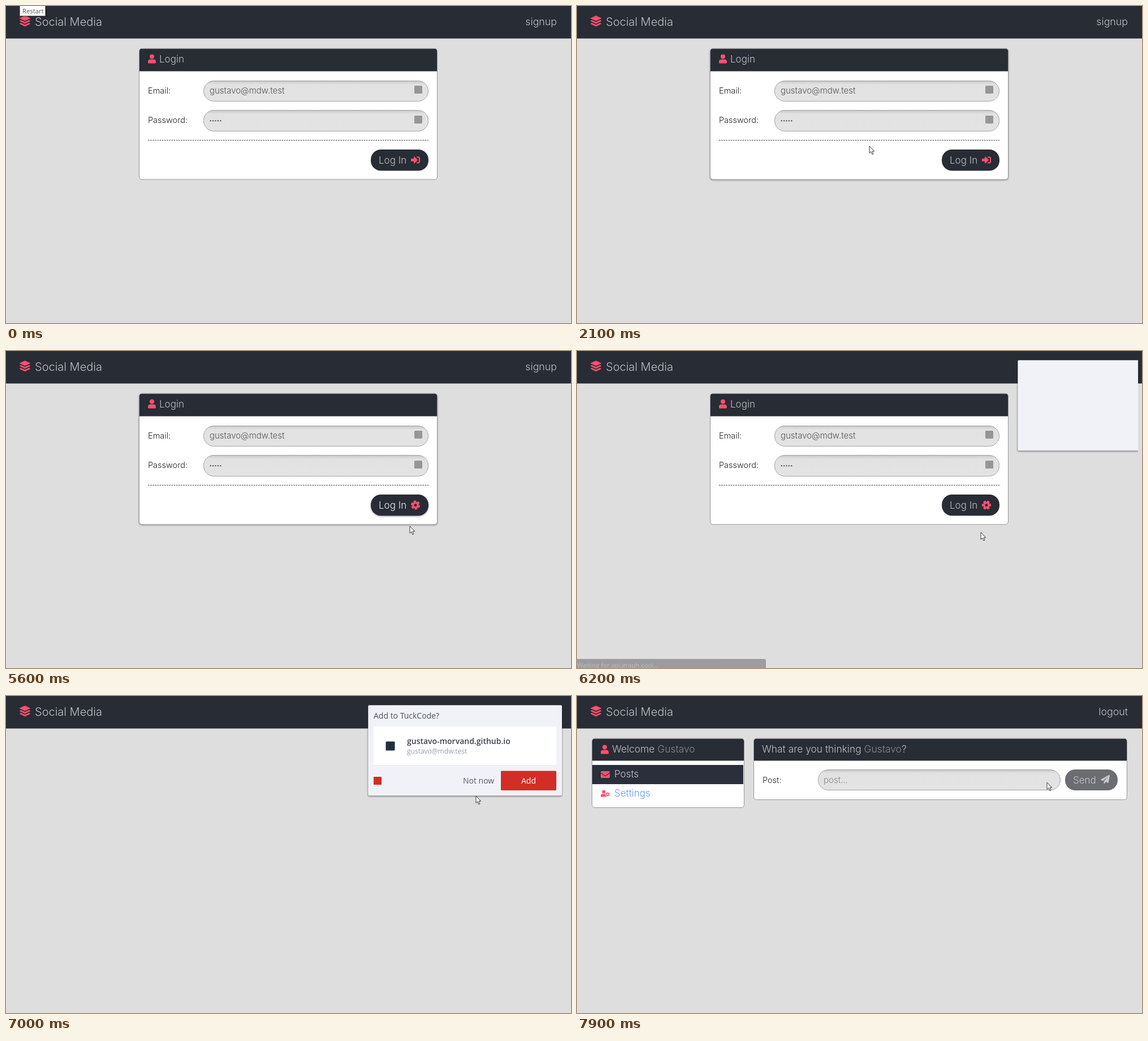
Recreate the animation shown at these times as an HTML page. Size 999 px wide and 561 px high, loop 8 s.

```html
<!DOCTYPE html>
<html lang="en">
<head>
<meta charset="utf-8">
<title>Social Media login</title>
<style>
  html, body { margin: 0; width: 100%; height: 100%; overflow: hidden; background: #dedede; }
  svg { display: block; width: 100vw; height: 100vh; }
  text { font-family: Inter, "Open Sans", sans-serif; font-weight: 300; white-space: pre; }
  .ui text { font-family: "Open Sans", "Noto Sans", sans-serif; font-weight: 400; }
  .ui .bold { font-weight: 600; }
</style>
</head>
<body>
<svg id="stage" viewBox="0 0 999 561" xmlns="http://www.w3.org/2000/svg"></svg>
<script>
const LOOP = 8000, STEP = 100;
const DARK = '#282c35', PINK = '#ff4f70', PALE = '#bfc0c3', RED = '#d32d27';
const USER = 'Gustavo', EMAIL = 'gustavo@mdw.test';

const text = (x, y, size, fill, str, extra = '') =>
  `<text x="${x}" y="${y}" font-size="${size}" fill="${fill}" ${extra}>${str}</text>`;
const rect = (x, y, w, h, fill, extra = '') =>
  `<rect x="${x}" y="${y}" width="${w}" height="${h}" fill="${fill}" ${extra}/>`;
const group = (id, body, extra = '') => `<g id="${id}" ${extra}>${body}</g>`;
const at = (x, y, body) => `<g transform="translate(${x} ${y})">${body}</g>`;

const field = (x, y, w, h) =>
  rect(x + .5, y + .5, w - 1, h - 1, 'url(#inset)', 'rx="18" stroke="#a2a2a2"');
const card = (x, y, w, h, head) =>
  rect(x + .5, y + .5, w - 1, h - 1, '#fff', 'rx="5" stroke="#96979a"') +
  `<path fill="${DARK}" d="M${x + 1} ${y + head}v${5 - head}q0-4 4-4h${w - 10}q4 0 4 4v${head - 5}z"/>`;

const person = `<g fill="${PINK}"><circle cx="7" cy="4" r="4"/>
  <path d="M0 14.5V13.2Q0 9 4.2 9H9.8Q14 9 14 13.2V14.5Q14 16 12.5 16H1.5Q0 16 0 14.5Z"/></g>`;
const band = 'l2.4-1.1 7.1 3.2 7.1-3.2 2.4 1.1-9.5 4.6z';
const layers = `<path fill="${PINK}" stroke="${PINK}" stroke-width=".7" stroke-linejoin="round"
  d="M33.5 17.4 42.9 21.7 33.5 26 24.1 21.7ZM24 26.4${band}M24 31.3${band}"/>`;
const enter = `<path fill="${PINK}" d="M0 6.2Q0 5.6.7 5.6H5V2.7Q5.2 1.6 6.2 2.1L11.6 7.5Q12 8 11.6 8.5L6.2 13.9Q5.2 14.4 5 13.3V10.4H.7Q0 10.4 0 9.8Z"/>
  <path fill="none" stroke="${PINK}" stroke-width="2" d="M10 3H13Q15 3 15 5V11Q15 13 13 13H10"/>`;
const teeth = (n, w, inner, outer) => Array.from({ length: n }, (_, i) =>
  rect(-w / 2, -outer, w, outer - inner, PINK, `rx=".9" transform="rotate(${i * 360 / n})"`)).join('');
const cog = (r, width, tooth, outer) =>
  `<circle r="${r}" fill="none" stroke="${PINK}" stroke-width="${width}"/>` + teeth(6, tooth, r, outer);
const mail = rect(0, 0, 16, 12, PINK, 'rx="1.5"') +
  '<path d="M0 3 6.5 7.8Q8 8.8 9.5 7.8L16 3" fill="none" stroke="#2b2e3b" stroke-width="1.1"/>';
const plane = `<path fill="#c6c7c9" d="M15.2.1Q16.1 0 16 1L13.8 13.6Q13.5 14.5 12.6 14.2L8.9 12.6 6.8 15.6Q6 16.3 5.6 15.2V11.5L13 3 4 10.7.6 9.3Q-.4 8.7.5 8Z"/>`;
const arrow = `<path fill="#fff" stroke="#222" stroke-width=".9" stroke-linejoin="round"
  d="M0 0V12.4L2.9 9.8 5 14.7 7 13.8 5 9.1H8.7Z"/>`;
const hand = `<path fill="#fff" stroke="#222" stroke-width=".9" stroke-linejoin="round"
  d="M-1.6 9V.6Q-1.4-.7-.2-.7T1.1.6V5.2Q2.4 4.6 3.3 5.8 4.7 5.2 5.3 6.4 7 6.1 7 7.9V11.5Q7 13.5 5.8 14.8V16.3H-.9V14.9Q-3 12.5-4.7 9.4-4.6 7.9-3.2 8.1Z"/>`;

const defs = `<defs>
  <linearGradient id="inset" x2="0" y2="1">
    <stop offset="0" stop-color="#c2c2c2"/><stop offset=".07" stop-color="#d3d3d3"/>
    <stop offset=".18" stop-color="#e2e2e2"/><stop offset="1" stop-color="#e3e3e3"/>
  </linearGradient>
  <filter id="soft" x="-10%" y="-20%" width="120%" height="140%"><feGaussianBlur stdDeviation="1.6"/></filter>
  <clipPath id="frame"><rect width="992" height="240"/></clipPath>
</defs>`;

const header = rect(0, 0, 999, 57.5, DARK) + layers +
  text(51, 35, 20, PALE, 'Social Media') +
  text(974, 34, 17.8, PALE, 'signup', 'id="session" text-anchor="end"');

const dots = Array.from({ length: 5 }, (_, i) =>
  `<circle cx="${361.8 + i * 4.4}" cy="203.2" r="1.15" fill="#444"/>`).join('');

const login = rect(235, 76.5, 528, 232, '#000', 'id="cardShade" rx="5" filter="url(#soft)"') +
  card(235, 74.7, 528, 232.8, 40.8) +
  at(251, 85.5, person) + text(271, 100, 17, PALE, 'Login') +
  text(251, 155, 14.5, '#222', 'Email:') + text(251, 207, 14.5, '#222', 'Password:') +
  field(349, 132, 398, 37) + field(349, 184, 398, 38) +
  text(360, 155, 15, '#555', EMAIL) + dots +
  rect(722, 141, 14, 14, '#969696', 'rx="1.5"') + rect(722, 194, 14, 14, '#969696', 'rx="1.5"') +
  '<path d="M251 237.5H747" stroke="#333" stroke-dasharray="2.5 1.65"/>' +
  rect(645, 256, 102, 37, '#000', 'id="buttonShade" rx="18" filter="url(#soft)"') +
  rect(645, 254, 102, 37.5, DARK, 'rx="18"') +
  text(659, 279, 17, PALE, 'Log In', 'id="loginLabel"') +
  group('enter', at(716, 264.5, enter)) + group('cog', cog(4.2, 3.3, 4.8, 8));

const name = `<tspan class="name" fill="#85878c">${USER}</tspan>`;
const home = card(26, 74.7, 270, 123.3, 39.8) + at(42, 86.5, person) +
  text(62, 100, 17.4, PALE, `Welcome ${name}`) +
  rect(27, 122, 267, 34, '#2b2e3b') +
  at(42, 133, mail) + text(66, 144, 17, '#c6c7c9', 'Posts') +
  at(42, 166.5, `<g transform="scale(.75)">${person}</g>`) +
  at(54.3, 174, '<circle r="4.4" fill="#fff"/>' + cog(2, 1.4, 2, 3.7)) +
  text(66, 178, 17, '#5f9af3', 'Settings') +
  card(312, 74.7, 661, 109.3, 39.8) +
  text(327, 100, 17.4, PALE, `What are you thinking ${name}?`) +
  text(328, 154, 14.5, '#222', 'Post:') + field(426, 130, 429, 37) +
  text(436, 154, 15, '#888', 'post...') +
  rect(863, 130, 93, 37, '#6b6d72', 'rx="18"') +
  text(877, 154.5, 17, '#c6c7c9', 'Send') + at(926, 139.5, plane);

const popup = rect(0, 17.5, 343, 160, '#000', 'rx="2" opacity=".5" filter="url(#soft)"') +
  rect(.3, 16.2, 342.7, 160, '#f1f2f7', 'rx="2"') +
  group('offer',
    text(10, 40, 14, '#49525c', 'Add to TuckCode?') +
    rect(10, 55, 323, 68, '#d3d7dd', 'rx="1"') + rect(10, 54, 323, 68.5, '#fff', 'rx="1"') +
    rect(31.5, 80.5, 16, 16, '#20313b', 'rx="1.5"') +
    text(69, 85, 14, '#3b444f', 'gustavo-morvand.github.io', 'class="bold"') +
    text(69, 102, 12, '#969da5', EMAIL) +
    rect(10, 143, 14, 14, RED) +
    text(168, 155, 14, '#545d67', 'Not now') +
    rect(235, 132.5, 98, 34.5, RED, 'rx="1.5"') +
    text(284, 155, 14, '#fff', 'Add', 'text-anchor="middle"'));

const status = rect(-4, 545, 338, 20, '#3b4046', 'rx="3"') +
  text(0, 559.5, 11.3, '#888c90', 'Waiting for api.graph.cool...');
const tip = rect(26, 2, 46, 17, '#000', 'opacity=".3"') +
  rect(24.5, -2.5, 45, 20, '#fff', 'stroke="#808080"') + text(29, 12.5, 11.3, '#575757', 'Restart');

const stage = document.getElementById('stage');
stage.innerHTML = defs + rect(0, 0, 999, 561, '#dedede') + header +
  group('login', login) + group('home', home) +
  `<g clip-path="url(#frame)">${group('popup', popup, 'class="ui"')}</g>` +
  group('status', status, 'class="ui"') + group('tip', tip, 'class="ui"') +
  group('cursor', group('arrow', arrow) + group('hand', hand));

const $ = id => document.getElementById(id);
const names = document.querySelectorAll('.name');
const show = (id, on) => $(id).setAttribute('display', on ? 'inline' : 'none');
const fade = (id, value) => $(id).setAttribute('opacity', value);
const move = (id, x, y, turn = 0) =>
  $(id).setAttribute('transform', `translate(${x} ${y}) rotate(${turn})`);
const ramp = (t, a, b) => Math.min(1, Math.max(0, (t - a) / (b - a)));
const between = (t, a, b) => t >= a && t < b;

// time, x, y of the pointer tip
const route = [
  [600, 48, -20], [900, 52, 21], [1200, 240, 70], [1500, 370, 130], [1700, 400, 155],
  [2100, 517, 248], [2400, 591, 260], [2600, 591, 260], [3100, 672, 270], [3500, 710, 275],
  [3600, 714, 275], [5000, 714, 275], [5600, 714, 310], [5800, 714, 321], [6300, 714, 321],
  [6800, 802, 225], [7000, 831, 177], [7300, 831, 153], [8000, 831, 153]
];
function pointer(t) {
  const i = Math.max(1, route.findIndex(p => p[0] >= t));
  const [a, b] = [route[i - 1], route[i]];
  const k = ramp(t, a[0], b[0]);
  return [a[1] + (b[1] - a[1]) * k, a[2] + (b[2] - a[2]) * k];
}

function draw(t) {
  show('tip', t < 400);
  show('login', t < 6700);
  show('home', t >= 7200);
  names.forEach(n => n.setAttribute('opacity', t >= 7700 ? 1 : 0));
  $('session').textContent = t < 5800 ? 'signup' : 'logout';

  const leave = 1 - ramp(t, 5600, 5900);
  const hover = ramp(t, 2950, 3300) * leave;
  fade('cardShade', .32 * ramp(t, 1250, 1900) * leave);
  fade('buttonShade', .3 * hover);
  const tone = Math.round(191 + 50 * hover);
  $('loginLabel').setAttribute('fill', `rgb(${tone},${tone},${tone + 2})`);
  show('enter', t < 4200);
  show('cog', t >= 4200);
  move('cog', 724, 272.7, (t - 4200) * .165);

  show('popup', between(t, 6000, 7700));
  move('popup', 640 + 367 * (1 - ramp(t, 6000, 6500)) ** 1.9, 0);
  show('offer', t >= 6600);
  fade('status', ramp(t, 5700, 5800) * (1 - ramp(t, 6100, 6270)));

  const overLink = between(t, 3000, 5300) || between(t, 7200, 7700);
  show('hand', overLink);
  show('arrow', !overLink);
  show('cursor', t >= 600);
  move('cursor', ...pointer(t));
}

function tick(now) {
  draw(Math.floor(now % LOOP / STEP) * STEP);
  requestAnimationFrame(tick);
}
draw(0);
requestAnimationFrame(tick);
</script>
</body>
</html>
```
